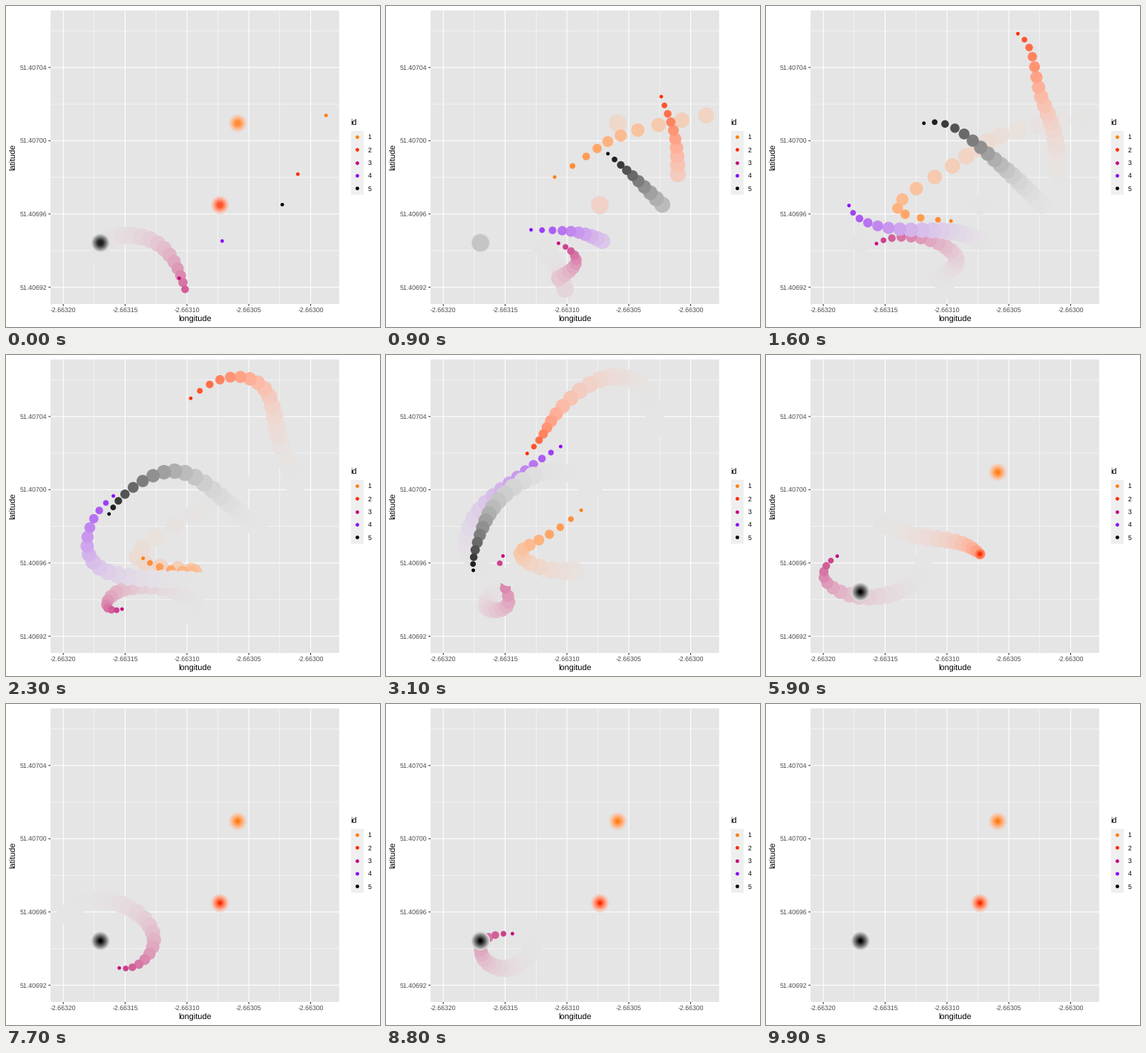
A matplotlib script for the animation above (10000 ms loop, 504x432 px).

```python
import numpy as np
import matplotlib.pyplot as plt
from matplotlib.animation import FuncAnimation
from matplotlib.patches import Rectangle

W, H, DPI = 504, 432, 72
FRAMES, INTERVAL = 100, 100
WAKE = 20
HEAD, TAIL = 4.8, 25.0
PANEL = "#E5E5E5"

plt.rcParams.update({"font.family": "Liberation Sans", "text.hinting": "no_hinting"})


def glide(points, end, step=5):
    """Natural cubic spline through points `step` frames apart, resting at `end`."""
    p = np.array(points, float)
    n = len(p)
    t = np.minimum(step * np.arange(n), end)
    h = np.diff(t)[:, None]
    a, rhs = np.eye(n), np.zeros((n, 2))
    slope = np.diff(p, axis=0) / h
    for k in range(1, n - 1):
        a[k, k - 1:k + 2] = h[k - 1, 0], 2 * (h[k - 1, 0] + h[k, 0]), h[k, 0]
        rhs[k] = 6 * (slope[k] - slope[k - 1])
    m = np.linalg.solve(a, rhs)

    f = np.minimum(np.arange(FRAMES), end)
    i = np.clip(np.searchsorted(t, f, side="right") - 1, 0, n - 2)
    u, v, h = (f - t[i])[:, None], (t[i + 1] - f)[:, None], h[i]
    return ((m[i] * v ** 3 + m[i + 1] * u ** 3) / (6 * h)
            + (p[i] / h - m[i] * h / 6) * v + (p[i + 1] / h - m[i + 1] * h / 6) * u)


TO_XYZ = np.array([[.4124, .3576, .1805], [.2126, .7152, .0722], [.0193, .1192, .9505]])
WHITE = TO_XYZ.sum(axis=1)
TO_LAB = np.array([[0, 116, 0], [500, -500, 0], [0, 200, -200]])


def rgb_to_lab(color):
    c = np.array([int(color[k:k + 2], 16) for k in (1, 3, 5)]) / 255
    c = np.where(c > .04045, ((c + .055) / 1.055) ** 2.4, c / 12.92)
    r = TO_XYZ @ c / WHITE
    f = np.where(r > .008856, np.cbrt(r), 7.787 * r + 16 / 116)
    return TO_LAB @ f - [16, 0, 0]


def lab_to_rgb(lab):
    fy = (lab[0] + 16) / 116
    f = np.array([fy + lab[1] / 500, fy, fy - lab[2] / 200])
    r = np.where(f > .2069, f ** 3, (f - 16 / 116) / 7.787)
    c = np.clip(np.linalg.inv(TO_XYZ) @ (r * WHITE), 0, 1)
    return np.clip(np.where(c > .0031308, 1.055 * c ** (1 / 2.4) - .055, 12.92 * c), 0, 1)


# Cubic falloff along the wake, by age in frames
keep = (1 - np.arange(WAKE + 1) / WAKE) ** 3
diam = TAIL + (HEAD - TAIL) * keep
ground = rgb_to_lab(PANEL)


class Track:
    def __init__(self, color, points, end, stays=True, step=5):
        self.color = color
        self.path = glide(points, end, step) + .3
        self.last = FRAMES if stays else end
        lab = rgb_to_lab(color)
        self.shades = [lab_to_rgb(ground + (lab - ground) * k) for k in keep]

    def dot(self, frame, age):
        return self.path[frame], diam[age], self.shades[age]

    def wake(self, frame):
        past = [((frame - age) % FRAMES, age) for age in range(WAKE, 0, -1)]
        return [self.dot(f, age) for f, age in past if f <= self.last]


tracks = [
    Track("#FF7F0E", [(431, 147), (316, 174), (251, 215), (177, 272), (249, 289),
                      (222, 289), (181, 267), (220, 241), (276, 196), (312, 157.5)],
          end=35, step=4),
    Track("#FF2A00", [(393, 226), (387, 167), (367, 109), (348, 45), (288, 33), (229, 79),
                      (199, 123), (150, 171), (144, 212), (190, 240), (255, 251), (288, 267.5)],
          end=55),
    Track("#C4087F", [(233, 366), (256, 341), (221, 315), (158, 315), (137, 340), (165, 332),
                      (153, 280), (195, 252), (212, 284), (185, 315), (125, 325), (78, 299),
                      (106, 266), (166, 274), (199, 317), (170, 354), (132, 343), (138, 314),
                      (194, 314), (231, 353), (241, 381)],
          end=98, stays=False),
    Track("#8A0CF5", [(291, 316), (249, 303), (180, 300), (117, 278), (118, 220),
                      (166, 172), (222, 131), (293, 90)],
          end=35, stays=False),
    Track("#000000", [(372, 267), (332, 228), (289, 190), (227, 156), (160, 187),
                      (130, 232), (117, 281), (127, 318.5)],
          end=35),
]


fig = plt.figure(figsize=(W / DPI, H / DPI), dpi=DPI, facecolor="white")
ax = fig.add_axes([0, 0, 1, 1])
ax.set(xlim=(0, W), ylim=(H, 0))
ax.axis("off")

L, T, R, B = 60, 5.5, 449, 401


def label(x, y, s, size=8.8, color="#4D4D4D", **kw):
    ax.text(x, y, s, fontsize=size, color=color, va="baseline", **kw)


def line(x, y, color="white", lw=1.07):
    ax.plot(x, y, color=color, lw=lw, solid_capstyle="butt", snap=False, zorder=1)


ax.add_patch(Rectangle((L, T), R - L, B - T, fc=PANEL, lw=0, zorder=0))
xs = 77.2 + 83.33 * np.arange(5)
ys = 378.4 - 98.55 * np.arange(4)
for x in xs[:-1] + 41.67:
    line([x, x], [T, B], lw=.53)
for y in ys - 49.27:
    line([L, R], [y, y], lw=.53)
for k, x in enumerate(xs):
    line([x, x], [T, B])
    line([x, x], [B, B + 2.75], "#333333")
    label(x, 412, f"{-2.6632 + k * 5e-5:.5f}", ha="center")
for k, y in enumerate(ys):
    line([L, R], [y, y])
    line([L - 2.75, L], [y, y], "#333333")
    label(55.3, y + 3.1, f"{51.40692 + k * 4e-5:.5f}", ha="right")
label(254.3, 425, "longitude", 11, "black", ha="center")
label(13.4, 203, "latitude", 11, "black", ha="center", rotation=90, rotation_mode="anchor")

label(464.6, 161, "id", 11, "black")
ax.add_patch(Rectangle((464.6, 167.5), 17.6, 86.4, fc="#EFEFEF", lw=0))
for k, track in enumerate(tracks):
    y = 176.2 + 17.28 * k
    ax.scatter([473.4], [y], s=HEAD ** 2, c=track.color, lw=0, zorder=3)
    label(487.5, y + 3.1, str(k + 1), color="black")

dots = ax.scatter([], [], lw=0, zorder=2)


def update(frame):
    # Wakes stacked by id, oldest first, then every head on top
    live = [t for t in tracks if frame <= t.last]
    parts = [d for t in live for d in t.wake(frame)] + [t.dot(frame, 0) for t in live]
    pos, size, color = zip(*parts)
    dots.set_offsets(np.array(pos))
    dots.set_sizes(np.square(size))
    dots.set_facecolor(np.array(color))
    return [dots]


anim = FuncAnimation(fig, update, frames=FRAMES, init_func=lambda: update(0),
                     interval=INTERVAL, repeat=True, repeat_delay=0)
plt.show()
```
